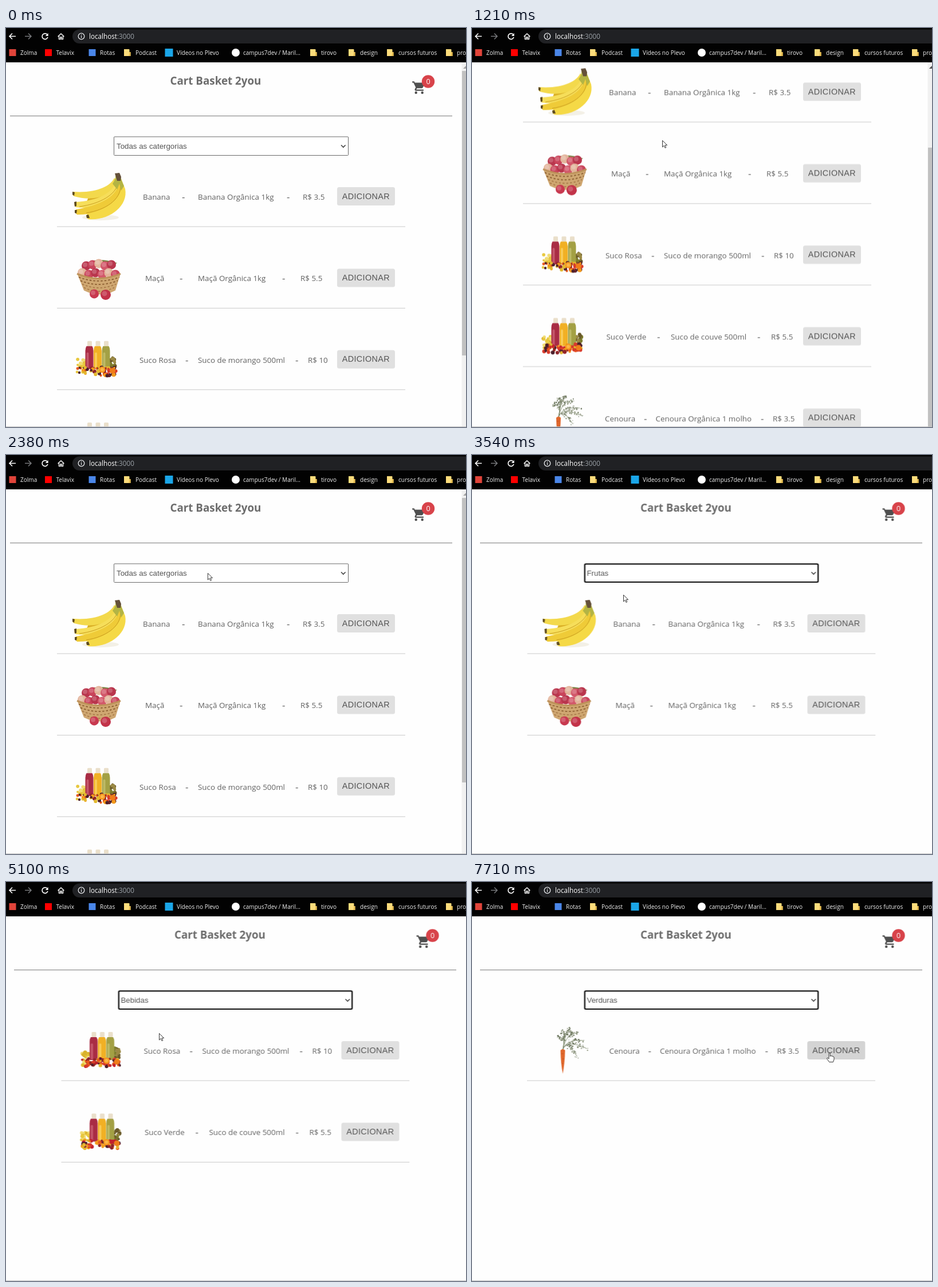
These frames come from a looping animation (803 px wide and 697 px high, 8000 ms). An HTML page:

```html
<!DOCTYPE html>
<html lang="pt-BR">
<head>
<meta charset="utf-8">
<title>Cart Basket 2you</title>
<style>
html, body { margin: 0; width: 100%; height: 100%; overflow: hidden; background: #fefefe; }
svg { display: block; width: 100%; height: 100%; }
text { font-family: "Open Sans", "Noto Sans", sans-serif; font-size: 13.42px; fill: #626262; white-space: pre; }
.title { font-size: 18.8px; font-weight: 700; fill: #6d6d6d; }
.dash { font-size: 17px; }
.btn { font: 14.35px "Liberation Sans", Arial, sans-serif; letter-spacing: .41px; fill: #555; }
.opt { font: 13.3px "Liberation Sans", Arial, sans-serif; fill: #555; }
.on { fill: #fff; }
.url { font-size: 11.7px; fill: #fff; }
.mark { font-size: 10.05px; fill: #f1f1f1; }
.badge { font-size: 12.5px; fill: #fff; text-anchor: middle; }
.menu { filter: drop-shadow(0 2px 3px rgba(0,0,0,.35)); }
</style>
</head>
<body>
<svg id="stage" viewBox="0 0 803 697" preserveAspectRatio="none"></svg>
<script>
const LOOP = 8000, ROW = 142.4;

let seed = 7;
const rnd = () => (seed = (seed * 16807) % 2147483647) / 2147483647;
const pick = list => list[Math.floor(rnd() * list.length)];
const repeat = (n, fn) => Array.from({ length: n }, (_, i) => fn(i)).join('');

const text = (x, y, s, cls = '') => `<text x="${x}" y="${y}" class="${cls}">${s}</text>`;
const rect = (x, y, w, h, fill, r = 0) => `<rect x="${x}" y="${y}" width="${w}" height="${h}" rx="${r}" fill="${fill}"/>`;
const disc = (x, y, r, fill) => `<circle cx="${x}" cy="${y}" r="${r}" fill="${fill}"/>`;
const path = (d, fill) => `<path d="${d}" fill="${fill}"/>`;
const line = (d, color, w = 1) => `<path d="${d}" fill="none" stroke="${color}" stroke-width="${w}"/>`;
const group = (id, body) => `<g id="${id}">${body}</g>`;

// Product pictures, all placed in the first row
function bananas() {
  return '<ellipse cx="165" cy="331" rx="32" ry="5" fill="#f3f0e6"/>' +
    path('M190 264C182 282 165 286 145 292L138 312L140 324L152 331C188 331 212 308 206 280L201 264Z', '#d9ae25') +
    path('M189 262C182 277 156 289 117 286Q114 291 119 294C150 303 184 296 194 268Z', '#f3d94c') +
    path('M192 266C188 288 160 302 121 304Q117 309 122 313C160 318 194 302 199 270Z', '#f6de5a') +
    path('M196 268C198 292 166 310 122 317Q119 322 124 326C168 327 204 306 204 272Z', '#efcb38') +
    path('M202 266C206 298 176 317 142 325Q138 331 144 334C180 337 214 311 208 281Z', '#f5d946') +
    line('M195 272C192 290 166 307 128 312M200 276C200 300 174 318 140 323', '#c99d1e') +
    path('M186 272Q192 264 191 257L199 256Q201 265 206 276L201 284L198 272L194 282Z', '#b3b444') +
    path('M190 254L198 253L201 260L200 267L194 267Z', '#64503a') +
    path('M116 286l4 1-1 6-3-2ZM119 304l4-1 0 8-3 1ZM120 318l4 0-1 6-3-1ZM140 327l4-1 2 6-5 0Z', '#5d4a20');
}

function basket() {
  const apple = (x, y, r, c) => disc(x, y, r, c) + `<circle cx="${x - 2}" cy="${y - 2}" r="${r * .5}" fill="#fff" opacity=".2"/>`;
  const reds = ['#c9445a', '#e3b49b', '#d2586a', '#b9364d'];
  return path('M146 267Q162 258 194 268L182 274Z', '#74823f') +
    repeat(5, i => apple(140 + i * 11, 273 - (i % 3) * 2, 8, reds[(i + 3) % 4])) +
    repeat(6, i => apple(133 + i * 11.6, 285 + i % 2 * 3, 8, reds[(i * 3 + 1) % 4])) +
    path('M124 286Q162 302 200 286L191 316Q164 330 136 316Z', '#cfa771') +
    repeat(4, k => `<path d="M${127 + k * 3} ${293 + k * 6}Q162 ${306 + k * 6} ${198 - k * 3} ${293 + k * 6}" fill="none" stroke="${k < 2 ? '#8a5d30' : '#a97b49'}" stroke-width="1.800" stroke-dasharray="3.500 3"/>`) +
    line('M124 287Q162 303 200 287', '#bd9259', 3) +
    apple(154, 322, 8, '#c8394f') + apple(174, 323.5, 9, '#c23349');
}

function juices() {
  const bottle = (x, c, shade) => rect(x + 3.5, 262, 8, 9, '#eadfca', 1.5) +
    path(`M${x + 3} 271h9q2 3 2 8v32h-14v-32q0-5 2-8Z`, c) + rect(x + 2, 282, 4, 28, shade, 2);
  const tones = ['#e8581d', '#f39a1c', '#c3212c', '#e3b92e', '#4c1f2c', '#d83a2b', '#8f2429'];
  const fruit = (n, x, w, y, h, list) => repeat(n, () => disc(x + rnd() * w, y + rnd() * h, 1.8 + rnd() * 1.8, pick(list)));
  return fruit(28, 124, 15, 294, 24, ['#e8c83f', '#f1dc74', '#d9b22c']) +
    fruit(18, 181, 10, 290, 18, ['#7c7c2c', '#9b8a45', '#6a5a2a']) +
    bottle(138.5, '#a92c44', '#c4566a') + bottle(153, '#f1b024', '#f8cb56') + bottle(167.5, '#a3a044', '#bdba66') +
    fruit(60, 125, 67, 308, 15, tones) +
    disc(168, 312, 5.5, '#f7961e') + disc(168, 312, 3, '#fcb747') + disc(186, 314, 5, '#ef7d1a');
}

function carrot() {
  const tips = [[142, 270], [151, 261], [162, 257], [176, 264], [188, 277], [193, 291], [176, 305]];
  const leaves = tips.map(([x, y]) => {
    const cx = 157, cy = Math.min(y, 274);
    return line(`M151 293Q${cx} ${cy} ${x} ${y}`, '#7d8a6c', .9) + repeat(24, i => {
      const t = .45 + i / 42, u = 1 - t;
      const px = u * u * 151 + 2 * u * t * cx + t * t * x, py = u * u * 293 + 2 * u * t * cy + t * t * y;
      return disc(px + rnd() * 7 - 3.5, py + rnd() * 7 - 3, .6 + rnd() * .8, pick(['#626d54', '#7f8870', '#9aa18b']));
    });
  }).flat().join('');
  return leaves + path('M147 294Q151 290 155 294Q154.500 316 151 335Q147.500 318 147 294Z', '#e0672c') +
    line('M148 300h4M150 309h4M149 317h3', '#c24f1d', .8);
}

// picture, then x and text of: name, dash, description, dash, price
const products = [
  [bananas, 239, 'Banana', 307, 335, 'Banana Orgânica 1kg', 490, 518, 'R$ 3.5'],
  [basket, 243, 'Maçã', 303, 335, 'Maçã Orgânica 1kg', 482, 514, 'R$ 5.5'],
  [juices, 233, 'Suco Rosa', 313, 335, 'Suco de morango 500ml', 505, 527, 'R$ 10'],
  [juices, 234.5, 'Suco Verde', 323, 347, 'Suco de couve 500ml', 498, 522, 'R$ 5.5'],
  [carrot, 232, 'Cenoura', 300, 320.5, 'Cenoura Orgânica 1 molho', 504, 525, 'R$ 3.5'],
];

function row(n, i) {
  const [pic, x1, name, d1, x2, about, d2, x3, price] = products[n];
  return `<g transform="translate(0 ${i * ROW})">` + pic() +
    text(x1, 300, name) + text(d1, 301, '-', 'dash') + text(x2, 300, about) +
    text(d2, 301, '-', 'dash') + text(x3, 300, price) +
    rect(578, 278, 101, 32, '#e0e0e0', 3.5) + text(586.7, 298.5, 'ADICIONAR', 'btn') +
    rect(89, 346.5, 608, 1, '#c9c9c9') + '</g>';
}

const options = ['Todas as catergorias', 'Frutas', 'Bebidas', 'Verduras'];
const members = [[0, 1, 2, 3, 4], [0, 1], [2, 3], [4]];

const lists = options.map((label, k) => group('list' + k,
  members[k].map(row).join('') + text(193, 211, label, 'opt'))).join('');

const select =
  '<rect x="188.500" y="190" width="409" height="32.500" rx="1" fill="#fff" stroke="#6a6a6a"/>' +
  group('focus', '<rect x="189.500" y="190.500" width="407" height="31.500" rx="2" fill="none" stroke="#101010" stroke-width="2"/>') +
  line('M585 204.500l3.800 3.800 3.800-3.800', '#444', 1.6);

const optY = k => 223.2 + k * 16.8;
const menu = group('menu', '<g class="menu">' + rect(189.5, 222, 408, 69, '#fff') + '</g>' +
  '<rect x="190" y="222.500" width="407" height="68" fill="#fff" stroke="#bdbdbd"/>' +
  options.map((s, k) => text(194, optY(k) + 12, s, 'opt')).join('') +
  options.map((s, k) => group('hot' + k, rect(190.5, optY(k), 406, 16.4, '#1e90ff') + text(194, optY(k) + 12, s, 'opt on'))).join(''));

const cart = '<path transform="translate(708 91) scale(1.1)" fill="#4f4f4f" d="M7 18a2 2 0 100 4 2 2 0 000-4zM1 2v2h2l3.600 7.600-1.350 2.440C4.500 15.400 5.500 17 7 17h12v-2H7.400l1.100-2h7.450c.75 0 1.410-.41 1.750-1.030l3.580-6.490A1 1 0 0020 4H5.200l-.94-2zM17 18a2 2 0 100 4 2 2 0 000-4z"/>' +
  disc(737, 93.5, 11.2, '#d8434a') + text(737, 98, '0', 'badge');

const page = group('page', group('scroll',
  text(286.5, 99, 'Cart Basket 2you', 'title') + cart + rect(7, 153, 772, 1.2, '#8c8c8c') +
  select + lists + group('hover', rect(578, 278, 101, 32, 'rgba(0,0,0,.05)', 3.5)) + menu));

const bar = group('bar', rect(795.5, 60, 8, 637, '#f1f1f1') +
  group('thumb', rect(796, 75, 8, 497, '#c1c1c1')) +
  path('M798 71L803 66L808 71Z', '#a3a3a3') + group('arrowOn', path('M798 71L803 66L808 71Z', '#505050')));

const folder = x => path(`M${x} 37h8.500q1 0 1 1v4h2v7h-11.500Z`, '#fbdc7b') + path(`M${x + 9.5} 42h2v7h-3Z`, '#e3b94c');
const marks = [[25, 'Zolma'], [87.5, 'Telavix'], [164, 'Rotas'], [226, 'Podcast'], [298, 'Vídeos no Plevo'],
  [414, 'campus7dev / Maril...'], [550, 'tirovo'], [618, 'design'], [685, 'cursos futuros'], [787, 'projetos']];

const chrome = rect(0, 0, 803, 60, '#020202') + rect(116, 2.5, 720, 24.5, '#202124', 12.2) +
  line('M17 14.500H6M11 9.500L6 14.500L11 19.500', '#fff', 1.6) +
  line('M33 14.500H44M39 9.500L44 14.500L39 19.500', '#77797c', 1.5) +
  line('M71.800 11.200A5 5 0 1 0 72.900 16', '#fff', 1.7) + path('M73.600 9v5h-5Z', '#fff') +
  line('M90.500 15L96 10L101.500 15M92.500 14V19.500H95V16H97V19.500H99.500V14', '#fff', 1.4) +
  '<circle cx="131.500" cy="14.500" r="5.300" fill="none" stroke="#e8eaed" stroke-width="1.300"/>' +
  rect(130.9, 13.8, 1.3, 3.6, '#e8eaed') + rect(130.9, 11.4, 1.3, 1.4, '#e8eaed') +
  '<text x="145" y="18.800" class="url">localhost<tspan fill="#9aa0a6">:3000</tspan></text>' +
  rect(5.5, 37, 12, 12, '#e0443a') + rect(68, 37, 12, 12, '#f00') + rect(144.5, 37, 12, 12, '#4a86e8') +
  rect(277.5, 36, 14, 14, '#1aa6e8') + disc(401, 43, 7, '#fff') +
  [206, 531, 598, 665, 768].map(folder).join('') +
  marks.map(([x, s]) => text(x, 46.8, s, 'mark')).join('');

const cursor = group('cursor', group('trail',
  group('arrow', '<path d="M.5.5V12L3.200 9.400L5 13.500L6.800 12.700L5.100 8.700H8.700Z" fill="#fff" stroke="#222" stroke-width=".9"/>') +
  group('hand', '<path d="M-1 1Q0-.5 1.200 1V6.500L2 5.500L4 6L5 6.200L7 7L8 8V12L6.500 16.500H-.5L-4.500 10.500Q-4.500 8.500-2.500 9.500L-1 11Z" fill="#fff" stroke="#222" stroke-width=".9" stroke-linejoin="round"/>')));

document.getElementById('stage').innerHTML =
  rect(0, 0, 803, 697, '#fefefe') + page + bar + rect(0, 696, 803, 1, '#c4c4c4') + chrome + cursor;

// Keyframes written in milliseconds
let css = '';
const at = ms => +(ms / LOOP * 100).toFixed(4) + '%';
function rule(id, frames) {
  css += `@keyframes ${id}{${frames}}#${id}{animation:${id} ${LOOP}ms linear infinite}`;
}
function shown(id, ...spans) {
  const key = (ms, v) => `${at(ms)}{opacity:${v};animation-timing-function:step-end}`;
  let frames = spans[0][0] > 0 ? key(0, 0) : '';
  for (const [a, b] of spans) frames += key(a, 1) + (b < LOOP ? key(b, 0) : '');
  rule(id, frames + `100%{opacity:${spans.at(-1)[1] < LOOP ? 0 : 1}}`);
}
function moved(id, points, ease = 'linear') {
  rule(id, points.map(([ms, x, y]) =>
    `${at(ms)}{transform:translate(${x}px,${y}px);animation-timing-function:${ease}}`).join(''));
}
// One group after another, each until the next time
function sequence(id, times) {
  times.slice(1).forEach((end, k) => shown(id + k, [times[k], end]));
}

const FRUIT = 3470, DRINK = 5020, GREEN = 6710, HAND = 7500;

const wheel = [[0, 0], [480, 0], [940, 182.7], [1220, 182.7], [1360, 256], [1460, 256], [2060, 0], [LOOP, 0]];
moved('scroll', wheel.map(([t, y]) => [t, 0, -y]), 'ease-in-out');
moved('thumb', wheel.map(([t, y]) => [t, 0, y * .733]), 'ease-in-out');
shown('arrowOn', [500, 2050]);
shown('bar', [0, FRUIT]);
moved('page', [[0, 0, 0], [FRUIT, 7.5, 0], [LOOP, 7.5, 0]], 'step-end');

sequence('list', [0, FRUIT, DRINK, GREEN, LOOP]);
sequence('hot', [0, 3000, 4800, 6440, LOOP]);
shown('menu', [2680, FRUIT], [4150, DRINK], [5860, GREEN]);
shown('focus', [FRUIT, 4380], [DRINK, 5860], [GREEN, LOOP]);

shown('cursor', [210, LOOP]);
shown('arrow', [0, HAND]);
shown('hand', [HAND, LOOP]);
shown('hover', [HAND, LOOP]);
moved('trail', [[0, 420, 697], [210, 420, 690], [600, 345, 300], [980, 332, 204], [1140, 332, 196], [1520, 332, 196],
  [2300, 352, 206], [2380, 352, 206], [2640, 290, 210], [2760, 288, 211], [3140, 264, 240], [3300, 264, 244],
  [3840, 264, 244], [4090, 262, 212], [4550, 262, 212], [4870, 267, 264], [5480, 267, 264], [5760, 276, 212],
  [5900, 277, 212], [6250, 284, 265], [6400, 284, 267], [6560, 281, 274], [7020, 281, 274], [7200, 345, 275],
  [7450, 560, 290], [7710, 624, 298], [LOOP, 624, 298]]);

document.head.appendChild(document.createElement('style')).textContent = css;
</script>
</body>
</html>
```
